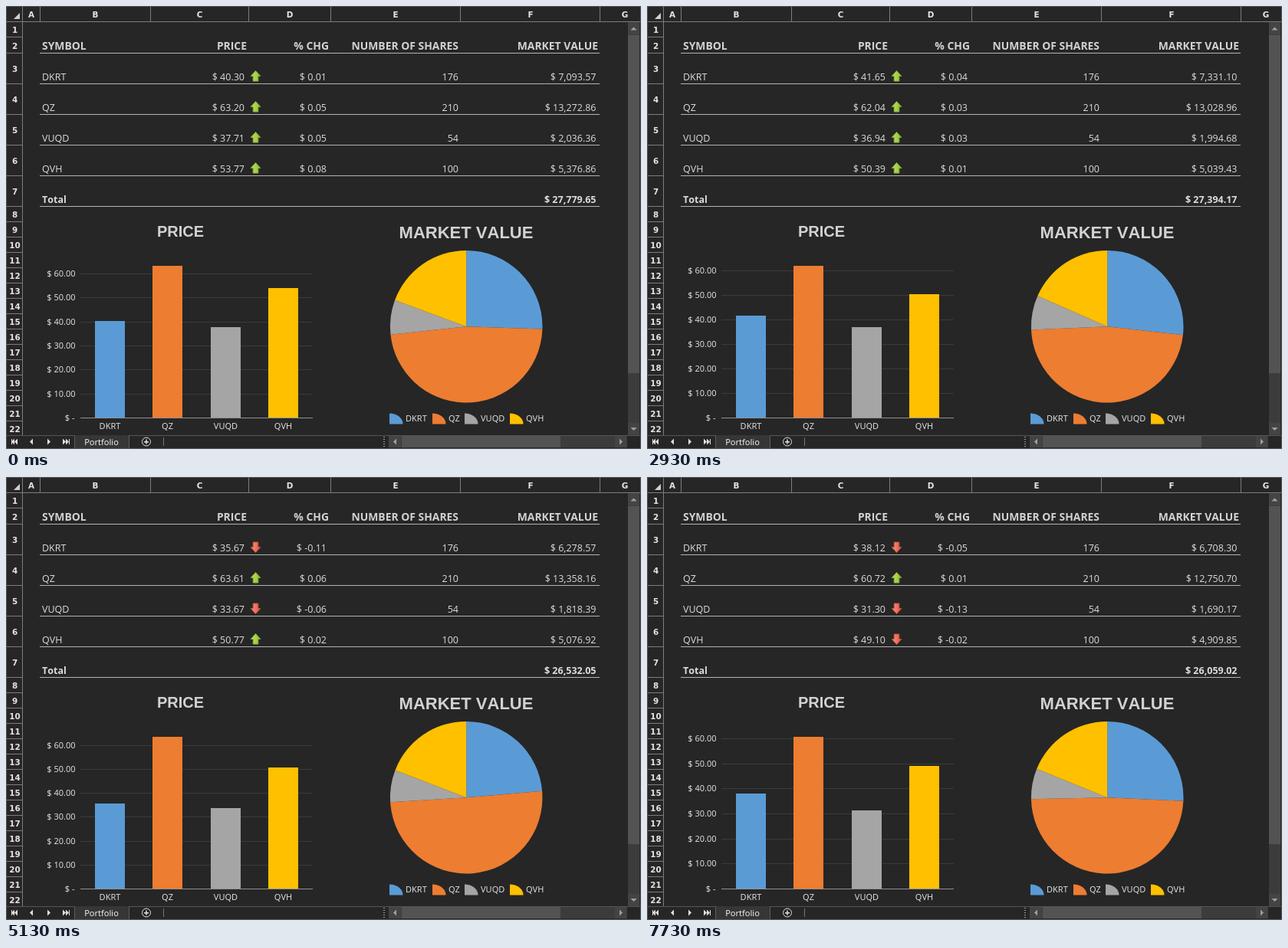
These frames come from a looping animation (828x578 px, 8 s). An HTML page with a canvas:

```html
<!DOCTYPE html>
<html lang="en">
<head>
<meta charset="utf-8">
<title>Portfolio sheet</title>
<style>
  html, body { margin: 0; width: 100%; height: 100%; overflow: hidden; background: #262626; }
  canvas { display: block; width: 828px; height: 578px; }
</style>
</head>
<body>
<canvas id="sheet" width="828" height="578"></canvas>
<script>
const ctx = document.getElementById('sheet').getContext('2d');
ctx.fontKerning = 'none';
const LOOP = 8000;

// swing: how much a price follows the wave instead of its trend
const stocks = [
  { name: 'DKRT', base: 40, shares: 176, swing: 1, color: '#5b9bd5', legend: 500 },
  { name: 'QZ', base: 60, shares: 210, swing: 0.2, color: '#ed7d31', legend: 556 },
  { name: 'VUQD', base: 36, shares: 54, swing: 0.2, color: '#a5a5a5', legend: 598 },
  { name: 'QVH', base: 50, shares: 100, swing: 0.2, color: '#ffc000', legend: 657 }
];

const ticks = [0, 270, 870, 1400, 1870, 2400, 2930, 3530,
  4070, 4600, 5130, 5670, 6200, 6730, 7270, 7730];

// market values at the key ticks
const keys = [
  { tick: 0, values: [7093.57, 13272.86, 2036.36, 5376.86] },
  { tick: 2, values: [6808.233, 13315.763, 2149.36, 5287.52] },
  { tick: 4, values: [7252.18, 11892.27, 2200.46, 4970.54] },
  { tick: 7, values: [6352.153, 13562.783, 1880.66, 5011.13] },
  { tick: 10, values: [6278.573, 13358.163, 1818.39, 5076.92] },
  { tick: 13, values: [7663.52, 12431.62, 1810.71, 4791.30] },
  { tick: 15, values: [6708.30, 12750.70, 1690.17, 4909.85] }
];

const FONT = {
  cell: '12.5px "Open Sans", sans-serif',
  total: 'bold 12.5px "Open Sans", sans-serif',
  head: 'bold 13.9px "Open Sans", sans-serif',
  small: '11px "Noto Sans", sans-serif',
  index: 'bold 10.4px "DejaVu Sans", sans-serif',
  title: 'bold 20px "Liberation Sans", Arial, sans-serif',
  bigTitle: 'bold 22px "Liberation Sans", Arial, sans-serif'
};
const INK = '#dcdcdc', HEAD = '#d2d2d2', EDGE = '#7d7d7d', RULE = '#b4b4b4';
const TRACK = '#3c3c3c', BUTTON = '#444', THUMB = '#535353', ARROW = '#a0a0a0';

const sum = list => list.reduce((a, b) => a + b);
const mix = (a, b, t) => a + (b - a) * t;
const money = v => '$ ' + v.toLocaleString('en-US', {
  minimumFractionDigits: 2, maximumFractionDigits: 2
});

function valuesAt(tick) {
  const a = keys.findLast(k => k.tick <= tick);
  if (a.tick === tick) return a.values;
  const b = keys.find(k => k.tick > tick);
  const t = (tick - a.tick) / (b.tick - a.tick);
  const wave = 1 + 0.07 * Math.cos((tick - 7.3) / 8.7 * Math.PI * 2);
  return stocks.map((s, i) =>
    mix(mix(a.values[i], b.values[i], t), s.base * s.shares * wave, s.swing));
}

function rect(x, y, w, h, color) {
  ctx.fillStyle = color;
  ctx.fillRect(x, y, w, h);
}

function text(str, x, y, font, align = 'left', color = INK) {
  ctx.font = font;
  ctx.textAlign = align;
  ctx.fillStyle = color;
  ctx.fillText(str, x, y);
}

function poly(points, fill, stroke) {
  ctx.beginPath();
  points.forEach(([x, y]) => ctx.lineTo(x, y));
  ctx.closePath();
  ctx.fillStyle = fill;
  ctx.fill();
  if (stroke) {
    ctx.strokeStyle = stroke;
    ctx.lineWidth = 1;
    ctx.stroke();
  }
}

// triangle with its tip at (x, y), pointing along (dx, dy)
function triangle(x, y, dx, dy, color = ARROW) {
  const size = 4;
  poly([
    [x, y],
    [x - dx * size + dy * size, y - dy * size + dx * size],
    [x - dx * size - dy * size, y - dy * size - dx * size]
  ], color);
}

function drawHeaders() {
  rect(0, 20, 828, 1, EDGE);
  rect(21, 0, 1, 560, EDGE);
  poly([[18, 9], [18, 17], [10, 17]], '#d0d0d0');

  [44, 188, 316, 423, 592, 774].forEach(x => rect(x, 1, 1, 19, EDGE));
  [33, 116.5, 252.5, 370, 508, 684, 807].forEach((x, i) =>
    text('ABCDEFG'[i], x, 15, FONT.index, 'center', '#e4e4e4'));

  let top = 20;
  for (let row = 1; row <= 22; row++) {
    const h = row === 2 ? 21 : row >= 3 && row <= 7 ? 40 : 20;
    text(row, 11.5, Math.round(top + h / 2 + 5), FONT.index, 'center', '#e4e4e4');
    top += h;
    if (row < 22) rect(0, top, 22, 1, EDGE);
  }
}

function drawScrollbars() {
  rect(811, 21, 15, 539, TRACK);
  rect(811, 22, 15, 15, BUTTON);
  triangle(818.5, 27.5, 0, -1);
  rect(811, 38, 15, 441, THUMB);
  rect(811, 544, 15, 15, BUTTON);
  triangle(818.5, 554, 0, 1);

  rect(499, 561, 311, 15, TRACK);
  rect(499, 561, 16, 15, BUTTON);
  triangle(505, 568.5, -1, 0);
  rect(516, 561, 207, 15, THUMB);
  rect(794, 561, 15, 15, BUTTON);
  triangle(804, 568.5, 1, 0);
}

function drawTabs() {
  const light = '#e0e0e0';
  rect(0, 560, 828, 1, '#555');
  [[7, -1], [11, -1], [31, -1], [58, 1], [78, 1], [82, 1]].forEach(([x, dir]) =>
    triangle(x, 568.5, dir, 0, light));
  rect(7, 565, 1, 7, light);
  rect(82, 565, 1, 7, light);

  rect(89, 560, 72, 18, '#5c5c5c');
  rect(90, 560, 70, 17, '#363636');
  text('Portfolio', 124.5, 573, FONT.small, 'center', '#eee');

  ctx.strokeStyle = light;
  ctx.lineWidth = 1;
  ctx.beginPath();
  ctx.arc(183, 568.5, 5.5, 0, 7);
  ctx.stroke();
  rect(180, 568, 6, 1.5, light);
  rect(182.2, 565.5, 1.5, 6, light);
  rect(205, 563, 1, 11, '#777');
  for (let y = 562; y < 576; y += 3) rect(492, y, 2, 1, '#999');
}

function drawTrend(y, up) {
  const s = up ? 1 : -1;
  const shape = [[0, -7], [6.3, 0], [3.3, 0], [3.3, 6.5], [-3.3, 6.5], [-3.3, 0], [-6.3, 0]];
  const fill = ctx.createLinearGradient(319, 0, 332, 0);
  fill.addColorStop(0, up ? '#c3e169' : '#f59a86');
  fill.addColorStop(1, up ? '#8fbf2a' : '#e2503c');
  poly(shape.map(([dx, dy]) => [325.5 + dx, y + s * dy]), fill, up ? '#86ad35' : '#c4513f');
}

function drawTable(values, prices) {
  text('SYMBOL', 47, 57, FONT.head, 'left', HEAD);
  [['PRICE', 314], ['% CHG', 421], ['NUMBER OF SHARES', 590], ['MARKET VALUE', 772]]
    .forEach(([label, x]) => text(label, x, 57, FONT.head, 'right', HEAD));
  for (let y = 61; y <= 261; y += 40) rect(44, y, 730, 1, RULE);

  stocks.forEach((s, i) => {
    const y = 97 + 40 * i;
    const change = prices[i] / s.base - 1;
    text(s.name, 47, y, FONT.cell);
    text(money(prices[i]), 311, y, FONT.cell, 'right');
    text('$ ' + change.toFixed(2), 418, y, FONT.cell, 'right');
    text(s.shares, 590, y, FONT.cell, 'right');
    text(money(values[i]), 769.5, y, FONT.cell, 'right');
    drawTrend(y - 5.5, change >= 0);
  });

  text('Total', 47, 257, FONT.total);
  text(money(sum(values)), 769.5, 257, FONT.total, 'right');
}

function drawBars(prices) {
  const max = Math.max(...prices);
  const yOf = v => Math.round(536.85 - v / max * 198);
  text('PRICE', 227.5, 301, FONT.title, 'center', HEAD);

  for (let v = 10; v <= max * 1.1; v += 10) {
    rect(97, yOf(v), 303, 1, '#3b3b3b');
    text(money(v), 90.5, yOf(v) + 4, FONT.small, 'right');
  }
  text('$ -', 89.5, 541, FONT.small, 'right');

  stocks.forEach((s, i) => {
    const x = Math.round(115.8 + 75.4 * i);
    const y = yOf(prices[i]);
    rect(x, y, 39, 537 - y, s.color);
    text(s.name, x + 19.5, 552, FONT.small, 'center');
  });
  rect(97, 537, 303, 1, '#919191');
}

function drawPie(values) {
  const cx = 600.2, cy = 418.2, total = sum(values);
  let from = -Math.PI / 2;
  text('MARKET VALUE', 600, 303, FONT.bigTitle, 'center', HEAD);

  stocks.forEach((s, i) => {
    const to = from + values[i] / total * Math.PI * 2;
    ctx.fillStyle = s.color;
    ctx.beginPath();
    ctx.moveTo(cx, cy);
    ctx.arc(cx, cy, 99.3, from, to);
    ctx.fill();
    from = to;

    ctx.beginPath();
    ctx.moveTo(s.legend, 545.5);
    ctx.ellipse(s.legend, 545.5, 17.5, 14, 0, -Math.PI / 2, 0);
    ctx.fill();
    text(s.name, s.legend + 21, 542, FONT.small);
  });
}

function draw(tick) {
  const values = valuesAt(tick);
  const prices = values.map((v, i) => v / stocks[i].shares);
  rect(0, 0, 828, 578, '#262626');
  drawHeaders();
  drawTabs();
  drawScrollbars();
  drawTable(values, prices);
  drawBars(prices);
  drawPie(values);
  ctx.strokeStyle = '#5a5a5a';
  ctx.lineWidth = 1;
  ctx.strokeRect(0.5, 0.5, 827, 577);
}

let shown = -1;
function frame() {
  const t = performance.now() % LOOP;
  const tick = ticks.findLastIndex(start => start <= t);
  if (tick !== shown) draw(shown = tick);
  requestAnimationFrame(frame);
}
frame();
</script>
</body>
</html>
```
